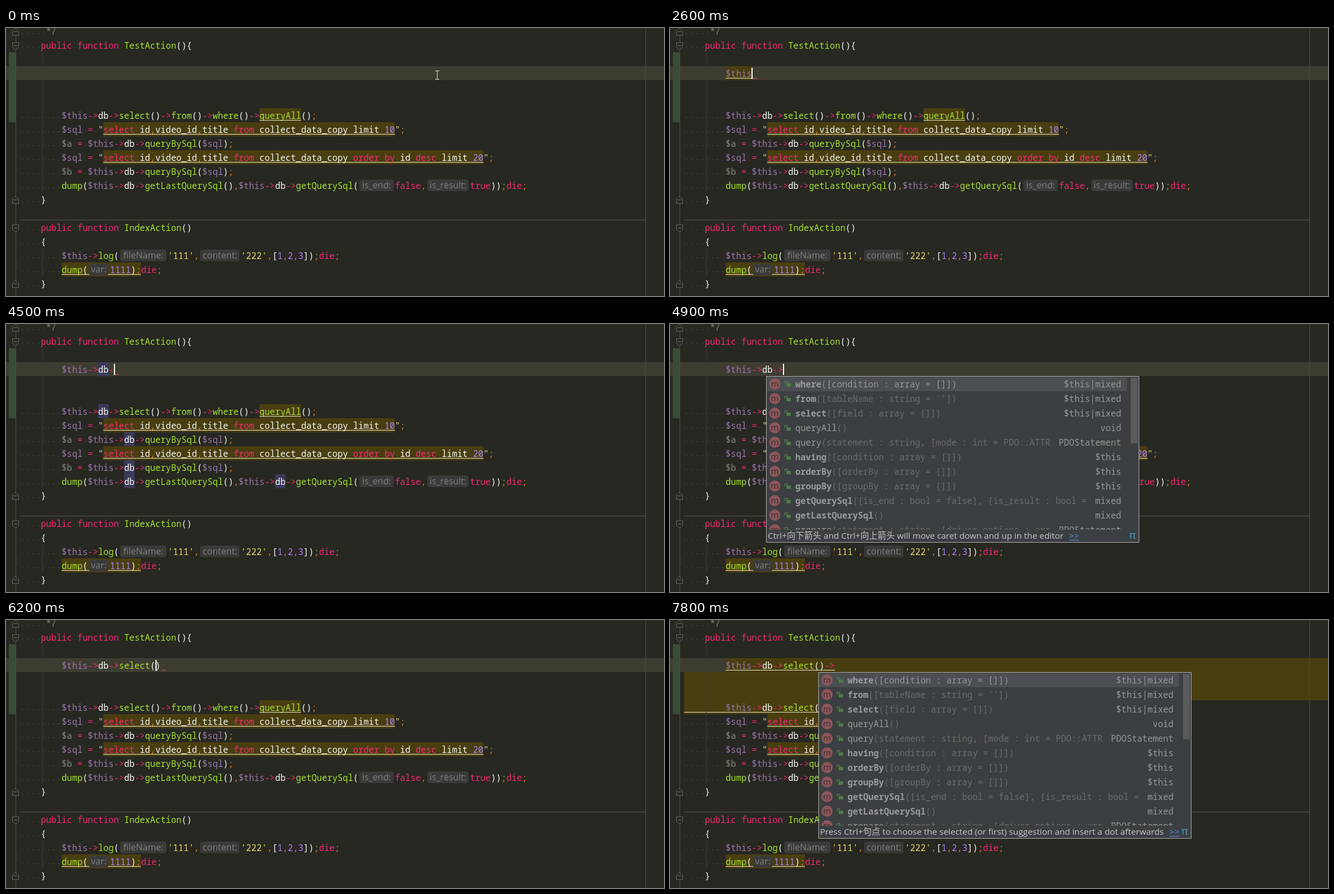
These frames come from a looping animation (1171x478 px, 8 s). An HTML page with a canvas:

```html
<!DOCTYPE html>
<html>
<head>
<meta charset="utf-8">
<style>
html, body { margin: 0; width: 100%; height: 100%; overflow: hidden; background: #272822; }
canvas { display: block; }
</style>
</head>
<body>
<canvas id="stage" width="1171" height="478"></canvas>
<script>
const ctx = document.getElementById('stage').getContext('2d');
const W = 1171, H = 478, LOOP = 8000;
const CHAR = 9.263, LEFT = 25, ROW = 25, TOP = -7, EDIT_ROW = 3;
const MONO = '15.44px "Noto Sans Mono", monospace';
const SANS = '"Open Sans", "Noto Sans CJK SC", "Noto Sans CJK", sans-serif';
const C = {
  bg: '#272822', band: '#3e3d32', olive: '#493e10', text: '#f8f8f2', pink: '#f92672', green: '#a6e22e',
  purple: '#9876aa', number: '#ae81ff', string: '#e6db74', orange: '#cc7832', grey: '#85857d',
  underline: '#f0ead0', dot: '#4b4c45', use: '#3b3a5c'
};

// {label|width} is an inlay hint occupying the given width.
const code = [
  '     */',
  '    public function TestAction(){',
  '', '', '', '',
  '        $this->db->select()->from()->where()->queryAll();',
  '        $sql = "select id,video_id,title from collect_data_copy limit 10";',
  '        $a = $this->db->queryBySql($sql);',
  '        $sql = "select id,video_id,title from collect_data_copy order by id desc limit 20";',
  '        $b = $this->db->queryBySql($sql);',
  '        dump($this->db->getLastQuerySql(),$this->db->getQuerySql({is_end:|65}false,{is_result:|78}true));die;',
  '    }',
  '',
  '    public function IndexAction()',
  '    {',
  "        $this->log({fileName:|87}'111',{content:|74.5}'222',[1,2,3]);die;",
  '        dump({var:|39.5}1111);die;',
  '    }'
];

const variables = ['this ~ userController\\TestController', '_POST ~ array', 'a ~ array', 'b ~ array', 'sql ~ string',
  '_COOKIE ~ array', '_ENV ~ array', '_FILES ~ array', '_GET ~ array', '_REQUEST ~ array', '_SERVER ~ array'];
const members = ['*db ~ Db', '*TestAction() ~ void', '*IndexAction() ~ void', 'log([fileName : string], [content : string]) ~ void',
  'display([view : string]) ~ void', 'assign(name : string, value) ~ void', 'redirect(url : string) ~ void',
  'getParam([name : string]) ~ mixed', 'isPost() ~ bool', 'isAjax() ~ bool', 'init() ~ void'];
const queries = ["*where([condition : array = []]) ~ $this|mixed", "*from([tableName : string = '']) ~ $this|mixed",
  '*select([field : array = []]) ~ $this|mixed', 'queryAll() ~ void',
  'query(statement : string, [mode : int = PDO::ATTR ~ PDOStatement', '*having([condition : array = []]) ~ $this',
  '*orderBy([orderBy : array = []]) ~ $this', '*groupBy([groupBy : array = []]) ~ $this',
  '*getQuerySql([is_end : bool = false], [is_result : bool = ~ mixed', '*getLastQuerySql() ~ mixed',
  'prepare(statement : string, [driver_options : arr ~ PDOStatement'];
const matchingS = [queries[2], 'setAttribute(attribute : int, value) ~ bool', queries[8], '*queryBySql(sql) ~ array', queries[9],
  'beginTransaction() ~ bool', 'inTransaction() ~ bool', 'lastInsertId([name : null|string = null]) ~ string'];
const CARET_TIP = 'Ctrl+向下箭头 and Ctrl+向上箭头 will move caret down and up in the editor';
const DOT_TIP = 'Press Ctrl+句点 to choose the selected (or first) suggestion and insert a dot afterwards';

const popup = (x, items, match = '', icon = 'm', tip = CARET_TIP) => ({ x, items, match, icon, tip });
const dollar = (items, match) => popup(79, items, match, '$');

// Each step changes part of the editor state; the caret follows the text unless given.
const steps = [
  [0, { text: '', caret: -1 }],
  [300, { caret: 0 }],
  [1300, { text: '$', popup: dollar(variables) }],
  [1800, { text: '$t', popup: dollar(variables.slice(0, 1), 't') }],
  [1900, { text: '$th', popup: dollar(variables.slice(0, 1), 'th') }],
  [2000, { text: '$thi', popup: dollar(variables.slice(0, 1), 'thi') }],
  [2300, { text: '$this', popup: null }],
  [2600, { mark: true, squiggle: true }],
  [2800, { text: '$this->', squiggle: false }],
  [2900, { popup: popup(112, members) }],
  [3100, { text: '$this->d', mark: false, popup: popup(112, [members[0], members[4], members[6]], 'd') }],
  [3300, { text: '$this->db', popup: popup(112, members.slice(0, 1), 'db') }],
  [3800, { popup: null }],
  [4100, { usages: true }],
  [4500, { text: '$this->db-', squiggle: true }],
  [4700, { text: '$this->db->', usages: false, squiggle: false }],
  [4800, { popup: popup(171, queries) }],
  [5000, { statement: true }],
  [5300, { text: '$this->db->s' }],
  [5400, { popup: popup(171, matchingS, 's') }],
  [5900, { text: '$this->db->select()', caret: 18, popup: null }],
  [6100, { statement: false }],
  [6200, { squiggle: true }],
  [6400, { caret: 19 }],
  [6800, { text: '$this->db->select()-' }],
  [7100, { text: '$this->db->select()->', squiggle: false, statement: true }],
  [7300, { popup: popup(264, queries, '', 'm', DOT_TIP) }],
  [7800, { caret: -1 }]
];

function stateAt(t) {
  const state = {};
  for (const [time, change] of steps) {
    if (time > t) break;
    Object.assign(state, change);
    if ('text' in change && !('caret' in change)) state.caret = change.text.length;
  }
  return state;
}

const colX = col => LEFT + col * CHAR;
const rowY = row => TOP + row * ROW;

function rect(x, y, w, h, color) {
  ctx.fillStyle = color;
  ctx.fillRect(x, y, w, h);
}

function line(points, color, width = 1) {
  ctx.strokeStyle = color;
  ctx.lineWidth = width;
  ctx.beginPath();
  points.forEach(([x, y]) => ctx.lineTo(x, y));
  ctx.stroke();
}

function label(text, x, y, size, color, align = 'left') {
  ctx.font = size + 'px ' + SANS;
  ctx.textAlign = align;
  ctx.fillStyle = color;
  ctx.fillText(text, x, y);
  ctx.textAlign = 'left';
}

function mono(text, x, y, color, bold = false) {
  ctx.font = (bold ? 'bold ' : '') + MONO;
  ctx.fillStyle = color;
  for (const ch of text) {
    if (ch !== ' ') ctx.fillText(ch, x, y);
    x += CHAR;
  }
  return x;
}

function tokenColor(token, rest) {
  if (token === '*/') return C.grey;
  if (/^\$[ab]$/.test(token)) return C.grey;
  if (/^\$\w/.test(token)) return C.purple;
  if (/^['"]/.test(token)) return C.string;
  if (/^\d/.test(token)) return C.number;
  if (/^[;,]/.test(token)) return C.orange;
  if (/^[-=]/.test(token)) return C.pink;
  if (/^\w/.test(token) && rest[0] === '(') return C.green;
  if (/^(public|function|die|true|false|select|from|order|by|desc)$/.test(token)) return C.pink;
  return C.text;
}

function drawHint(text, x, width, y) {
  ctx.fillStyle = '#3a3a38';
  ctx.beginPath();
  ctx.roundRect(x + 2, y + 2, width - 4.5, 21, 4);
  ctx.fill();
  label(text, x + width / 2, y + 18, 16, '#7d7d7b', 'center');
}

function drawCode(text, row, x = LEFT) {
  const y = rowY(row);
  const pattern = /\{(\w+:)\|([\d.]+)\}|\*\/|\$\w*|->?|'\w*'|\w+|./g;
  for (const m of text.matchAll(pattern)) {
    if (m[1]) {
      drawHint(m[1], x, +m[2], y);
      x += +m[2];
    } else if (m[0] === ' ') {
      rect(x + 4, y + 16, 1.5, 1.5, C.dot);
      x += CHAR;
    } else {
      x = mono(m[0], x, y + 19, tokenColor(m[0], text.slice(m.index + m[0].length)));
    }
  }
}

function highlight(row, x1, x2) {
  rect(x1, rowY(row), x2 - x1, ROW, C.olive);
  rect(x1, rowY(row) + 21, x2 - x1, 1, C.underline);
}

function drawFold(row, opens) {
  const y = rowY(row) + 14, d = opens ? 1 : -1;
  const shape = [[11.5, y - 6 * d], [22.5, y - 6 * d], [22.5, y + 2 * d], [17, y + 7 * d], [11.5, y + 2 * d], [11.5, y - 6 * d]];
  ctx.fillStyle = C.bg;
  ctx.beginPath();
  shape.forEach(([x, py]) => ctx.lineTo(x, py));
  ctx.fill();
  line(shape, '#64655f');
  line([[14, y - .5], [20, y - .5]], '#75766f');
}

function drawEditor(state) {
  const textStart = colX(8), textEnd = colX(8 + state.text.length), y = rowY(EDIT_ROW);
  rect(0, 0, W, H, C.bg);
  rect(0, y, W, ROW, C.band);
  // The unfinished statement swallows everything up to the end of the next one.
  if (state.statement) {
    rect(textStart, y, W, ROW, C.olive);
    rect(LEFT, y + ROW, W, 2 * ROW, C.olive);
    rect(textStart, y + 21, textEnd - textStart, 1, C.underline);
    highlight(6, LEFT, colX(code[6].length));
  }
  rect(1138, 0, 1, H, '#4c4d47');
  rect(17, 0, 1, H, '#4c4d47');
  rect(5, 43, 12, 125, '#384c38');
  rect(64, 43, 1, 250, '#3a3b35');
  rect(64, 393, 1, 50, '#3a3b35');
  rect(LEFT, 342, 1113, 1, '#555650');
  [1, 14].forEach(row => drawFold(row, true));
  [0, 12, 18].forEach(row => drawFold(row, false));

  highlight(6, colX(46), colX(54));
  highlight(7, colX(16), colX(72));
  highlight(9, colX(16), colX(89));
  highlight(17, textStart, 240);
  if (state.mark) highlight(EDIT_ROW, textStart, colX(13));

  code.forEach((text, row) => {
    const shown = row === EDIT_ROW ? ' '.repeat(8) + state.text : text;
    if (state.usages) {
      for (const m of shown.matchAll(/db/g)) rect(colX(m.index), rowY(row), 2 * CHAR, ROW, C.use);
    }
    if (row === EDIT_ROW) drawCode(state.text, row, textStart);
    else drawCode(text, row);
  });

  if (state.squiggle) {
    line([0, 1, 2, 3, 4].map(i => [textEnd + 2 + i * 1.8, y + (i % 2 ? 20.5 : 23)]), '#e04848');
  }
  if (state.caret >= 0) rect(Math.round(colX(8 + state.caret)), 71, 2, 20, '#fff');
}

function drawIcon(icon, x, y) {
  ctx.fillStyle = icon === '$' ? '#916d35' : '#8c555b';
  ctx.beginPath();
  ctx.arc(x + 15.5, y, 10, 0, 7);
  ctx.fill();
  label(icon, x + 15.5, y + 5, 15, '#34302c', 'center');
  if (icon === '$') return;
  rect(x + 36, y - 1, 8, 6, '#4b7c48');
  line([[x + 33.5, y], [x + 33.5, y - 4], [x + 38, y - 4], [x + 38, y]], '#4b7c48', 1.5);
}

function drawItem(item, p, y, selected) {
  const [signature, type] = item.split(' ~ ');
  const bold = signature[0] === '*';
  const [, name, params] = signature.match(/^\*?([^(]*)(.*)$/);
  const start = p.x + (p.icon === '$' ? 30 : 52);
  const hit = p.match ? name.toLowerCase().indexOf(p.match) : -1;
  drawIcon(p.icon, p.x, y);
  [...name].forEach((ch, i) => {
    const matched = hit >= 0 && i >= hit && i < hit + p.match.length;
    mono(ch, start + i * CHAR, y + 6, matched ? '#a86fac' : '#989b9d', bold);
  });
  mono(params, start + name.length * CHAR, y + 6, selected ? '#95989a' : '#686b6d');
  mono(type, p.x + 632 - type.length * CHAR, y + 6, '#95989a');
}

function drawPopup(p) {
  const top = 93, width = 664, height = Math.min(297, 24 + 26 * p.items.length), bottom = top + height;
  rect(p.x, top, width, height, '#b0b2b3');
  rect(p.x + 1, top + 1, width - 2, height - 2, '#3c3f41');
  rect(p.x + 2, 95, 640, 25, '#4b4f52');
  ctx.save();
  ctx.beginPath();
  ctx.rect(p.x, top, width, height - 23);
  ctx.clip();
  p.items.forEach((item, i) => drawItem(item, p, 107 + 26 * i, i === 0));
  ctx.restore();
  if (p.items.length > 10) rect(p.x + 649, 96, 12, 117, '#595b5d');

  const y = bottom - 7;
  label(p.tip, p.x + 3, y, 15.35, '#c3c5c6');
  const linkX = p.x + 3 + ctx.measureText(p.tip).width + 10;
  label('>>', linkX, y, 15.35, '#5394ec');
  rect(linkX, y + 2, ctx.measureText('>>').width, 1, '#5394ec');
  label('π', p.x + 652, y, 19, '#3f97c9', 'center');
}

function drawMouse(t) {
  if (t >= 700) return;
  const k = Math.min(1, Math.floor(t / 100) / 5);
  const x = 767 - 415 * k * k * (3 - 2 * k), y = 84;
  line([[x - 3, y - 7.5], [x + 4, y - 7.5]], '#ddd');
  line([[x + .5, y - 7], [x + .5, y + 7]], '#ddd');
  line([[x - 3, y + 7.5], [x + 4, y + 7.5]], '#ddd');
}

function frame(now) {
  const t = now % LOOP, state = stateAt(t);
  drawEditor(state);
  if (state.popup) drawPopup(state.popup);
  drawMouse(t);
}

const startTime = performance.now();
function tick() {
  frame(performance.now() - startTime);
  requestAnimationFrame(tick);
}
tick();
</script>
</body>
</html>
```
